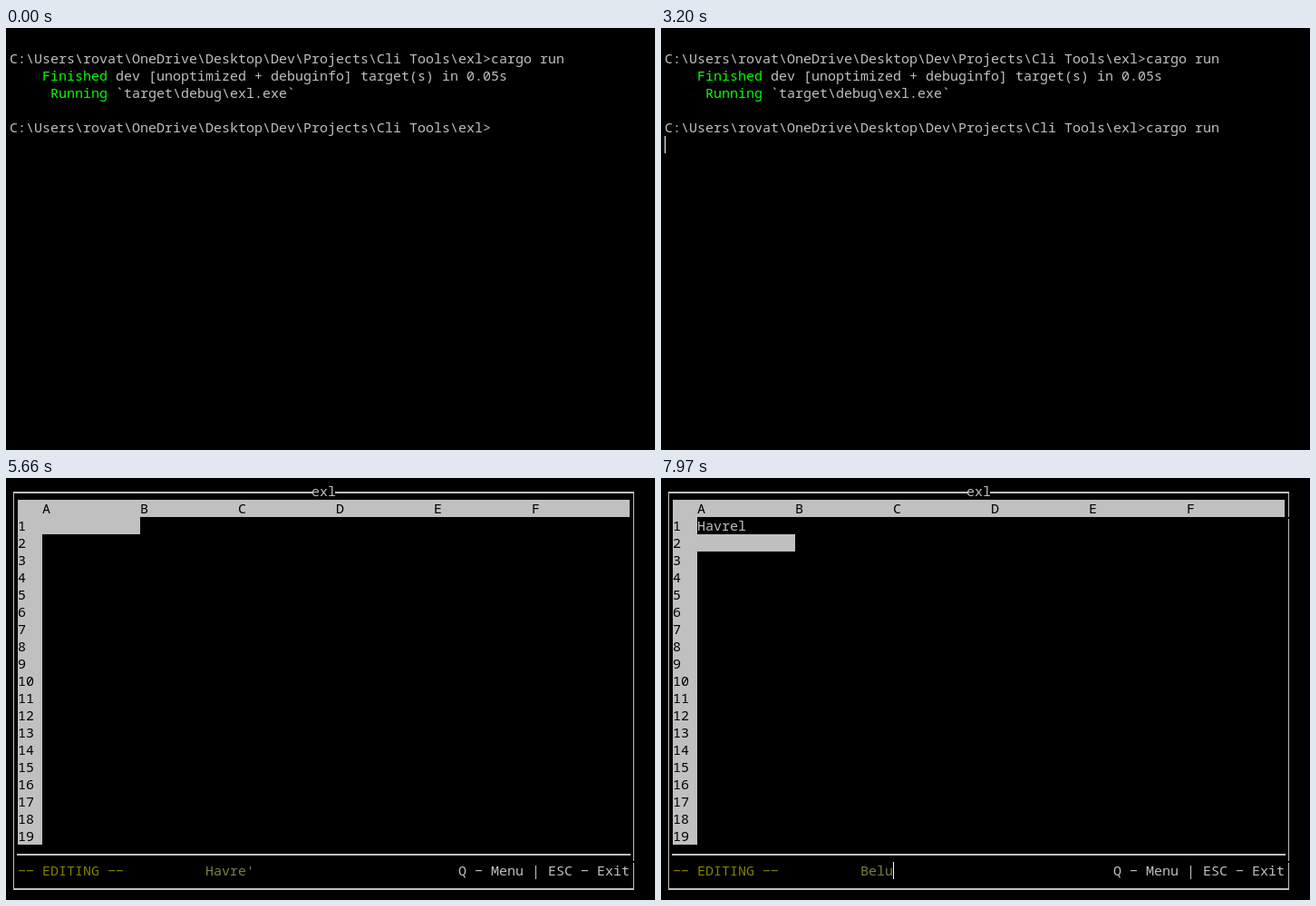
An HTML page that plays this animation: 716x465 px, repeating every 8000 ms.

```html
<!DOCTYPE html>
<html lang="en">
<head>
<meta charset="utf-8">
<title>Terminal spreadsheet</title>
<style>
  html, body { margin: 0; width: 100%; height: 100%; overflow: hidden; background: #000; }
  svg { display: block; width: 716px; height: 465px; }
  text { font: 500 15px "Noto Sans Mono", "DejaVu Sans Mono", monospace; white-space: pre; }
</style>
</head>
<body>
<svg viewBox="0 0 716 465" xmlns="http://www.w3.org/2000/svg">
  <clipPath id="partial"><path d="M0 0H716V214H13V233H0Z"/></clipPath>
  <g id="shell"></g>
  <g id="app"></g>
  <rect id="caret" width="1" height="19" fill="#fff"/>
  <path id="pointer" d="M0 0V15L3.5 12L6 17L8 16L5.8 11H11Z" fill="#fff"/>
</svg>
<script>
const LOOP = 8000, CW = 9, RH = 19;
const GREY = '#c0c0c0', LIME = '#00ff00', OLIVE = '#808000', GREEN = '#008000', INPUT = '#7c8040';
const PROMPT = 'C:\\Users\\rovat\\OneDrive\\Desktop\\Dev\\Projects\\Cli Tools\\exl>';
const NAME = 'Havrel';

const $ = id => document.getElementById(id);
const shell = $('shell'), app = $('app'), caret = $('caret'), pointer = $('pointer');
const colX = c => 4 + c * CW;
const rowY = r => 5 + r * RH;

function add(parent, tag, attrs) {
  const el = document.createElementNS('http://www.w3.org/2000/svg', tag);
  for (const k in attrs) el.setAttribute(k, attrs[k]);
  return parent.appendChild(el);
}
function label(parent, col, row, str, fill = GREY) {
  const el = add(parent, 'text', { x: colX(col), y: rowY(row) + 15, fill });
  el.textContent = str;
  return el;
}
function box(parent, x, y, x2, y2, fill = GREY) {
  return add(parent, 'rect', { x, y, width: x2 - x, height: y2 - y, fill });
}
const show = (el, on) => el.setAttribute('visibility', on ? 'visible' : 'hidden');

// Command prompt
label(shell, 0, 1, PROMPT + 'cargo run');
label(shell, 4, 2, 'Finished', LIME);
label(shell, 13, 2, 'dev [unoptimized + debuginfo] target(s) in 0.05s');
label(shell, 5, 3, 'Running', LIME);
label(shell, 13, 3, '`target\\debug\\exl.exe`');
label(shell, 0, 5, PROMPT);
const command = label(shell, PROMPT.length, 5, '');

// Spreadsheet
box(app, 8, 15, 338, 17);
box(app, 363, 15, 693, 17);
label(app, 37, 0, 'exl');
box(app, 8, 15, 9, 454);
box(app, 692, 15, 693, 454);
box(app, 692, 422, 693, 424, '#000');
const notch = box(app, 692, 43, 693, 45, '#000');
box(app, 8, 452, 693, 454);
box(app, 12, 414, 689, 416);
box(app, 13, 24, 688, 43);
box(app, 13, 43, 40, 404);
[...'ABCDEF'].forEach((c, i) => label(app, 4 + i * 12, 1, c, '#000'));
for (let n = 1; n <= 19; n++) label(app, 1, n + 1, n, '#000');
const selection = box(app, 40, 43, 148, 62);
const cell = label(app, 4, 2, '');
const mode = label(app, 1, 22, '');
const value = label(app, 24, 22, '');
label(app, 55, 22, 'Q \u2212 Menu | ESC \u2212 Exit');

// Each table row is [start time, value]
const COMMAND = [[0, ''], [1890, 'c'], [2050, 'ca'], [2290, 'car'], [2450, 'carg'], [2590, 'cargo'],
  [2750, 'cargo '], [2890, 'cargo r'], [2980, 'cargo ru'], [3060, 'cargo run']];
const VALUE = [[0, ''], [4580, 'H'], [4750, 'Ha'], [4810, 'Hav'], [4870, 'Havr'], [4920, 'Havre'],
  [5080, "Havre'"], [6450, 'Havre'], [6550, NAME], [7160, ''],
  [7630, 'B'], [7830, 'Be'], [7900, 'Bel'], [7970, 'Belu']];
const EDITING = [[0, false], [4350, true], [6760, false], [7360, true]];
const CARET = [[0, false], [1630, true], [3340, false], [4350, true], [5660, false],
  [5920, true], [6760, false], [7360, true]];
const POINTER = [[0, null], [1330, [658, 455]], [1360, [614, 408]], [1400, [574, 367]],
  [1430, [560, 353]], [1860, null]];

function at(steps, t) {
  let v;
  for (const [start, next] of steps) if (t >= start) v = next;
  return v;
}

function draw(t) {
  const inApp = t >= 3340, editing = at(EDITING, t), second = t >= 7160;
  const typed = at(COMMAND, t), entry = at(VALUE, t), tip = at(POINTER, t);
  show(shell, !inApp);
  app.setAttribute('display', inApp ? 'inline' : 'none');
  app.setAttribute('clip-path', t < 3370 ? 'url(#partial)' : 'none');

  command.textContent = typed;
  mode.textContent = `\u2212\u2212 ${editing ? 'EDITING' : 'NAVIGATING'} \u2212\u2212`;
  mode.setAttribute('fill', editing ? OLIVE : GREEN);
  value.textContent = entry;
  value.setAttribute('fill', editing ? INPUT : GREY);
  selection.setAttribute('y', rowY(second ? 3 : 2));
  cell.textContent = t >= 6760 ? NAME : '';
  cell.setAttribute('fill', second ? GREY : '#000');
  show(notch, second);

  let col = PROMPT.length + typed.length, row = 5;
  if (inApp) [col, row] = [24 + entry.length, 22];
  else if (t >= 3200) [col, row] = [0, 6];
  caret.setAttribute('x', colX(col));
  caret.setAttribute('y', rowY(row));
  show(caret, at(CARET, t));

  show(pointer, tip);
  if (tip) pointer.setAttribute('transform', `translate(${tip})`);
}

const begin = performance.now();
function tick() {
  draw((performance.now() - begin) % LOOP);
  requestAnimationFrame(tick);
}
tick();
</script>
</body>
</html>
```
